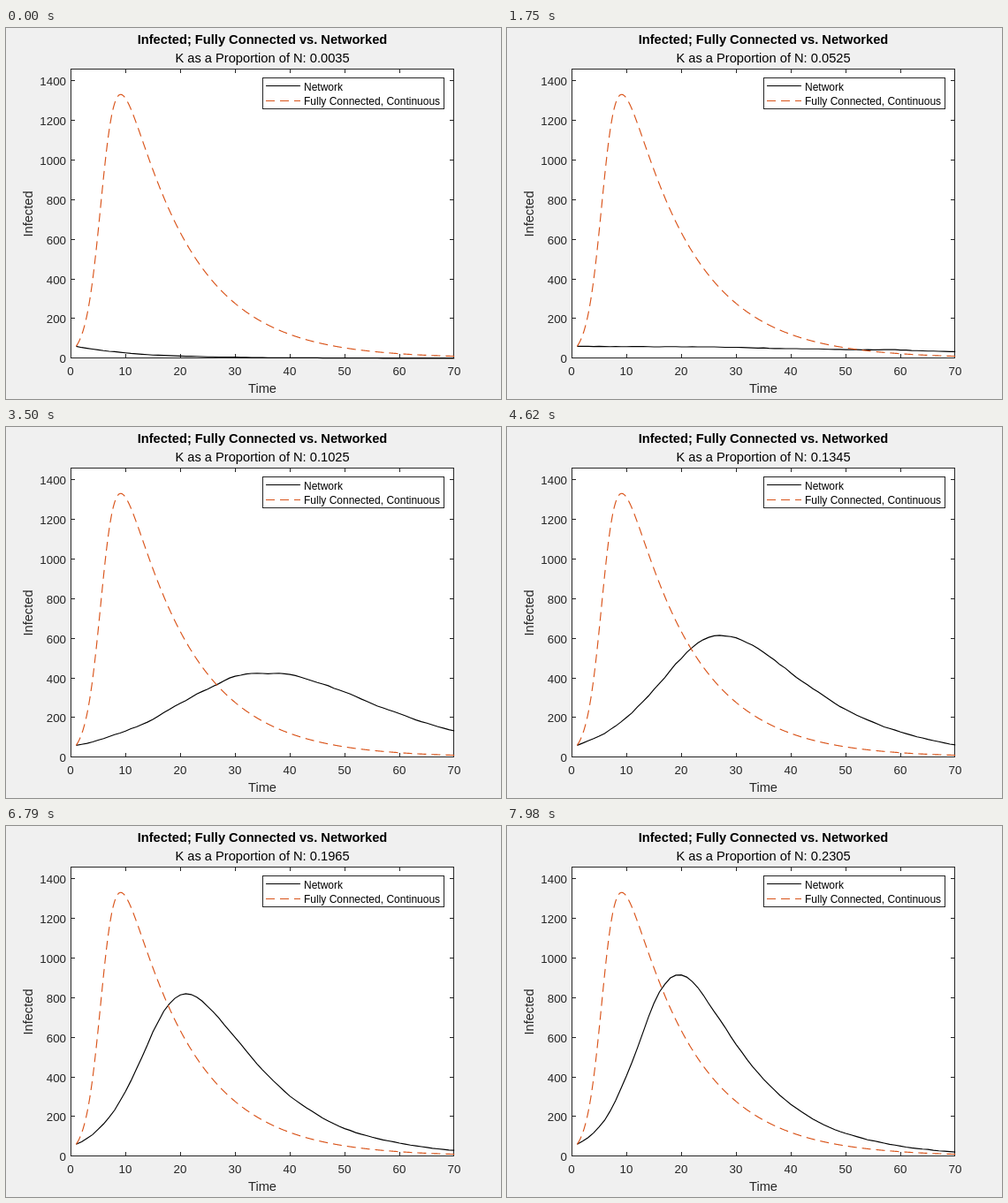
Recreate the animation shown at these times as an HTML page with a canvas. Size 560 px wide and 420 px high, loop 8 s.

```html
<!DOCTYPE html>
<html lang="en">
<head>
<meta charset="utf-8">
<title>Infected</title>
<style>
  html, body { margin: 0; height: 100%; overflow: hidden; background: #f0f0f0; }
  canvas { display: block; }
</style>
</head>
<body>
<canvas id="chart" width="560" height="420"></canvas>
<script>
const ctx = document.getElementById('chart').getContext('2d');
const LOOP = 8000, STEP = 70, AXIS = '#262626', ORANGE = '#d95319';
const POPULATION = 2000, RECOVERY = 1 / 12;
const px = t => 73.2 + t * 6.2;
const py = count => 373.8 - count * 0.2242;

// Repeatable noise in -1..1
function noise(a, b) {
  const v = Math.sin(a * 127.1 + b * 311.7) * 43758.5453;
  return 2 * (v - Math.floor(v)) - 1;
}

// SIR epidemic from t = 1 to 70; a seed adds random variation to each step.
function epidemic(reproduction, dt, seed) {
  const points = [];
  let healthy = 1940, infected = 60;
  for (let n = 0; n <= 69 / dt; n++) {
    points.push([px(1 + n * dt), py(seed === undefined ? infected : Math.round(infected))]);
    const caught = reproduction * RECOVERY * healthy * infected / POPULATION * dt;
    const cured = RECOVERY * infected * dt;
    const luck = seed === undefined ? 0 : 0.4 * Math.sqrt(caught + cured) * noise(seed, n);
    healthy -= caught;
    infected = Math.max(0, infected + caught - cured + luck);
  }
  return points;
}

const continuous = epidemic(9.6, 0.05);

// Denser networks spread more, levelling off at a reproduction number of 5.
function networkCurve(k, step) {
  const reproduction = 5 * (1 - Math.exp(-Math.pow(k / 0.146, 1.45)));
  return epidemic(reproduction, 1, step);
}

function line(points, color, width = 1, dash = []) {
  ctx.strokeStyle = color;
  ctx.lineWidth = width;
  ctx.setLineDash(dash);
  ctx.beginPath();
  points.forEach(p => ctx.lineTo(...p));
  ctx.stroke();
}

function text(str, x, y, size, align = 'center', color = '#000', weight = '') {
  ctx.font = `${weight} ${size}px "Liberation Sans", Arial, sans-serif`;
  ctx.textAlign = align;
  ctx.fillStyle = color;
  ctx.fillText(str, x, y);
}

function box(x, y, w, h) {
  ctx.fillStyle = '#fff';
  ctx.fillRect(x, y, w, h);
  ctx.strokeStyle = AXIS;
  ctx.lineWidth = 1;
  ctx.setLineDash([]);
  ctx.strokeRect(x, y, w, h);
}

function drawAxes() {
  box(73.5, 46.5, 433, 327);
  for (let t = 0; t <= 70; t += 10) {
    const x = Math.min(506.5, Math.floor(px(t)) + 0.5);
    line([[x, 373], [x, 369]], AXIS);
    line([[x, 47], [x, 51]], AXIS);
    text(t, px(t) - 0.2, 393, 13.33, 'center', AXIS);
  }
  for (let count = 0; count <= 1400; count += 200) {
    const y = Math.floor(py(count)) + 0.5;
    line([[74, y], [78, y]], AXIS);
    line([[506, y], [502, y]], AXIS);
    text(count, 68, y + 5.5, 13.33, 'right', AXIS);
  }
  text('Time', 290, 413, 14.67, 'center', AXIS);
  ctx.save();
  ctx.translate(30, 210.5);
  ctx.rotate(-Math.PI / 2);
  text('Infected', 0, 0, 14.67, 'center', AXIS);
  ctx.restore();
}

function drawLegend() {
  box(290.5, 56.5, 205, 35);
  line([[294, 65.5], [333, 65.5]], '#000');
  line([[294, 82.5], [333, 82.5]], ORANGE, 1, [10, 6]);
  text('Network', 337, 71, 12, 'left');
  text('Fully Connected, Continuous', 337, 87, 12, 'left');
}

function draw(now) {
  const step = Math.floor(now % LOOP / STEP);
  const k = Math.max(0.0035, 0.0025 + 0.002 * step);
  ctx.fillStyle = '#f0f0f0';
  ctx.fillRect(0, 0, 560, 420);
  text('Infected; Fully Connected vs. Networked', 290, 18, 14.67, 'center', '#000', 'bold');
  text('K as a Proportion of N: ' + k.toFixed(4), 290, 39, 14.67);
  drawAxes();
  line(networkCurve(k, step), '#000', 1.15);
  line(continuous, ORANGE, 1.15, [10, 6]);
  drawLegend();
}

const start = performance.now();
function tick() {
  draw(performance.now() - start);
  requestAnimationFrame(tick);
}
tick();
</script>
</body>
</html>
```
